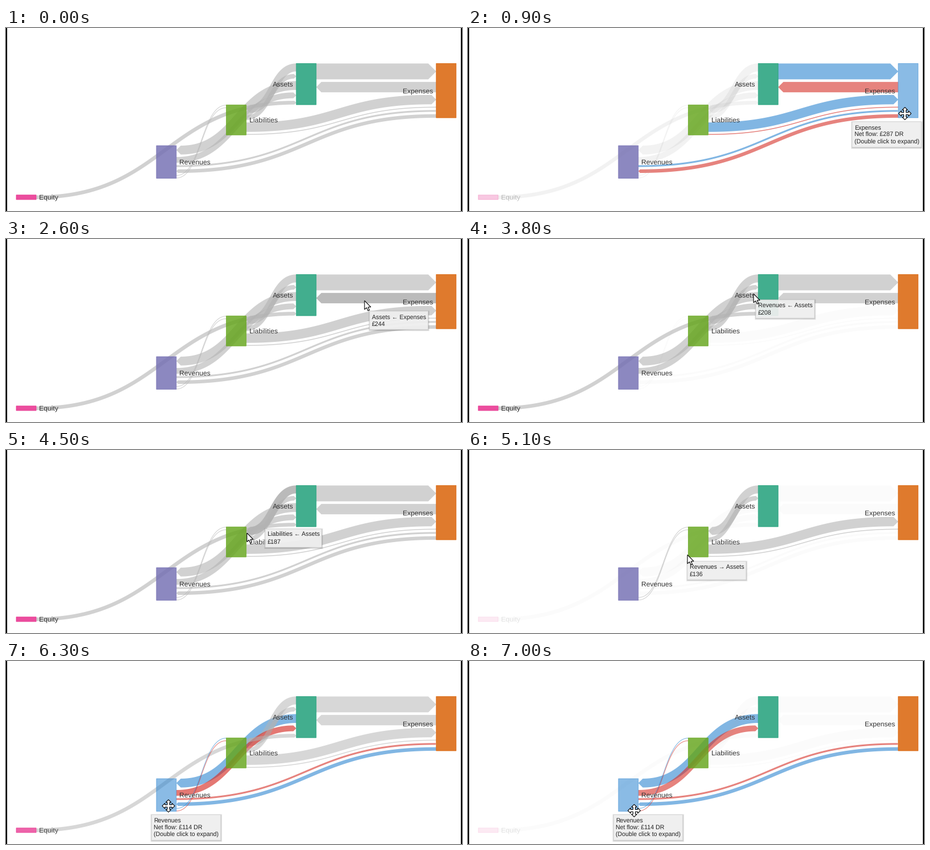
These frames come from a looping animation (800 px wide and 322 px high, 7.1 s). A matplotlib script:

```python
import numpy as np
import matplotlib.pyplot as plt
from matplotlib.animation import FuncAnimation
from matplotlib.colors import to_rgb
from matplotlib.patches import Polygon, Rectangle

W, H, DPI = 800, 322, 100
FRAMES, STEP = 71, 100
PX = 72 / DPI
SCALE = 0.075            # link thickness in pixels per pound
NODE_W = 34.9
GREY, INFLOW, OUTFLOW = "#b3b3b3", "#2e86d1", "#d63028"
LINK_ON, LINK_FADED, LINK_HOT = 0.6, 0.05, 0.9
NODE_ON, NODE_HOT = 0.83, 0.56
FADE, GLOW = 400, 200
HELD = (15, 29, 69)      # frames that repeat the one before

plt.rcParams["font.family"] = "Liberation Sans"
plt.rcParams["text.hinting"] = "none"

# name: x, top, bottom, colour, label x, label alignment
NODES = {
    "Equity": (18, 293.8, 301.9, "#e7298a", 58.2, "left"),
    "Revenues": (263.9, 207, 264.5, "#7570b3", 304, "left"),
    "Liabilities": (386.4, 135.3, 188.2, "#66a61e", 426.6, "left"),
    "Assets": (509.2, 62.4, 135, "#1b9e77", 504, "right"),
    "Expenses": (754.8, 62.4, 158, "#d95f02", 749.2, "right"),
}

# left node, right node, direction, value, left y, right y
LINKS = [
    ("Assets", "Expenses", 1, 372, 76.4, 76.4),
    ("Assets", "Expenses", -1, 244, 104, 104),
    ("Liabilities", "Expenses", 1, 221, 174.5, 126),
    ("Revenues", "Assets", -1, 208, 214.8, 101.2),
    ("Liabilities", "Assets", -1, 187, 142.4, 69.4),
    ("Revenues", "Assets", 1, 136, 232.1, 118.5),
    ("Liabilities", "Assets", 1, 107, 157.8, 85),
    ("Equity", "Assets", 1, 87, 297.8, 131.4),
    ("Revenues", "Expenses", -1, 83, 251.9, 154.8),
    ("Revenues", "Expenses", 1, 41, 243, 145.9),
    ("Liabilities", "Expenses", -1, 20, 187.2, 139.3),
    ("Revenues", "Liabilities", -1, 14, 259.4, 135.7),
    ("Revenues", "Liabilities", 1, 14, 264, 140.4),
]

# start, thing under the pointer (node, link or nothing), tooltip corner
EVENTS = [
    (650, "Expenses", (674, 165)),
    (1250, None, None),
    (1350, ("Revenues", "Expenses", -1), (676, 170)),
    (1690, ("Revenues", "Expenses", 1), (676, 164)),
    (2250, ("Liabilities", "Expenses", 1), (654, 146)),
    (2440, ("Assets", "Expenses", -1), (638, 127)),
    (3080, "Assets", (540, 119)),
    (3790, ("Revenues", "Assets", -1), (505, 107)),
    (4250, ("Liabilities", "Assets", -1), (455, 139)),
    (4520, "Liabilities", (419, 166)),
    (5090, ("Revenues", "Assets", 1), (385, 196)),
    (5450, ("Revenues", "Assets", -1), (350, 219)),
    (5790, ("Revenues", "Assets", 1), (325, 238)),
    (6170, "Revenues", (255.5, 270.5)),
]
ENDS = [e[0] for e in EVENTS[1:]] + [10 ** 6]

# pointer path: time, x, y
PATH = np.array([
    (100, 738, 314), (400, 750, 225), (700, 768, 152), (1100, 765, 149),
    (1250, 752, 153), (1450, 702, 153), (1700, 675.5, 146.5),
    (2200, 671, 142), (2400, 652, 126), (2600, 629, 108.5), (2900, 585, 106),
    (3080, 541, 104), (3400, 527, 100), (3700, 513, 97), (3800, 501, 96.5),
    (4200, 468, 115), (4450, 430, 140), (4600, 408, 158), (4900, 398, 170),
    (5100, 385, 184.5), (5400, 355, 204), (5800, 322.7, 226.5),
    (6100, 301, 243), (6300, 285, 255), (6800, 291.5, 263.3),
])

ARROW = np.array([(0, 0), (0, 15.5), (3.6, 12.3), (6.1, 17.8), (8.6, 16.8),
                  (6.2, 11.4), (11, 11.2)])
ARM = np.array([(-2, -2), (-2, -6.2), (-4.8, -6.2), (0, -11),
                (4.8, -6.2), (2, -6.2)])
TURN = np.array([(0, 1), (-1, 0)])
CROSS = np.vstack([ARM @ np.linalg.matrix_power(TURN, k) for k in range(4)])


def ease(u):
    u = min(max(u, 0), 1)
    return 4 * u ** 3 if u < 0.5 else 1 - 4 * (1 - u) ** 3


def pulse(t, start, end, span):
    return ease((t - start) / span) - ease((t - end) / span)


def ribbon(left, right, way, value, y0, y1):
    """Outline of a curved band with a pointed end."""
    w = value * SCALE
    a, b = NODES[left][0] + NODE_W, NODES[right][0]
    x0, x1 = (a, b - w / 2) if way > 0 else (a + w / 2, b)
    s = np.linspace(0, 1, 70)
    x = x0 * (1 - s) ** 3 + x1 * s ** 3 + 1.5 * (x0 + x1) * s * (1 - s)
    y = y0 + (y1 - y0) * s * s * (3 - 2 * s)
    dx, dy = np.gradient(x), np.gradient(y)
    dy[0] = dy[-1] = 0
    n = np.column_stack([-dy, dx]) / np.hypot(dx, dy)[:, None] * w / 2
    mid = np.column_stack([x, y])
    top, low = mid - n, (mid + n)[::-1]
    if way > 0:
        return np.vstack([top, [(b, y1)], low])
    return np.vstack([top, low, [(a, y0)]])


def net_flow(name):
    total = 0
    for left, right, way, value, *_ in LINKS:
        total += value * way * ((right == name) - (left == name))
    return total


def tip_lines(item):
    if isinstance(item, str):
        net = net_flow(item)
        side = "DR" if net > 0 else "CR"
        return [item, f"Net flow: £{abs(net)} {side}",
                "(Double click to expand)"]
    left, right, way = item
    value = next(k[3] for k in LINKS if k[:3] == item)
    return [f"{left} {'→' if way > 0 else '←'} {right}", f"£{value}"]


def linked(a, b):
    return a == b or any({a, b} == set(k[:2]) for k in LINKS)


fig = plt.figure(figsize=(W / DPI, H / DPI), dpi=DPI, facecolor="white")
ax = fig.add_axes([0, 0, 1, 1])
ax.set(xlim=(0, W), ylim=(H, 0))
ax.axis("off")

bands = [ax.add_patch(Polygon(ribbon(*k), lw=0, zorder=1)) for k in LINKS]
boxes, labels = {}, {}
for name, (x, top, low, color, lx, align) in NODES.items():
    boxes[name] = ax.add_patch(Rectangle((x, top), NODE_W, low - top,
                                         lw=0.9 * PX, snap=False, zorder=2))
    labels[name] = ax.text(lx, (top + low) / 2 + 4.5, name, ha=align,
                           va="baseline", size=12.1 * PX, color="#333",
                           zorder=3)
for x in (0, W - 2):
    ax.add_patch(Rectangle((x, 0), 2, H, color="black", lw=0, zorder=9))

shades = [ax.add_patch(Rectangle((0, 0), 1, 1, color="black", lw=0,
                                 snap=False, zorder=4)) for _ in range(4)]
card = ax.add_patch(Rectangle((0, 0), 1, 1, fc="#f3f3f3", ec="#d2d2d2",
                              lw=0.9 * PX, snap=False, zorder=5))
rows = [ax.text(0, 0, "", size=10.65 * PX, color="#222", va="baseline",
                zorder=6) for _ in range(3)]
pointer = ax.add_patch(Polygon(ARROW, fc="white", ec="black", lw=1.1 * PX,
                               joinstyle="miter", zorder=8))


def current(t):
    found = -1
    for i, event in enumerate(EVENTS):
        if t >= event[0]:
            found = i
    return found


def draw_links(t, hover):
    for band, (left, right, way, *_) in zip(bands, LINKS):
        alpha = LINK_ON
        for (start, item, _), end in zip(EVENTS, ENDS):
            if isinstance(item, str) and item not in (left, right):
                alpha -= (LINK_ON - LINK_FADED) * pulse(t, start, end, FADE)
            elif item == (left, right, way):
                alpha += (LINK_HOT - LINK_ON) * pulse(t, start, end, GLOW)
        color = GREY
        if hover in (left, right):
            goal = right if way > 0 else left
            color = INFLOW if goal == hover else OUTFLOW
        band.set_facecolor(color)
        band.set_alpha(min(max(alpha, 0), 1))


def draw_nodes(t, hover):
    for name, box in boxes.items():
        shown = 1
        for (start, item, _), end in zip(EVENTS, ENDS):
            if isinstance(item, str) and not linked(item, name):
                shown -= 0.88 * pulse(t, start, end, FADE)
        color, alpha = NODES[name][3], NODE_ON
        if name == hover:
            color = INFLOW if net_flow(name) > 0 else OUTFLOW
            alpha = NODE_HOT
        rgb = to_rgb(color)
        box.set_facecolor(rgb + (alpha * shown,))
        box.set_edgecolor(rgb + (alpha * shown,))
        labels[name].set_alpha(shown)


def draw_tip(t, i):
    alpha = 0
    if i >= 0:
        start, item, spot = EVENTS[i]
        if item is None:
            alpha = 1 - ease((t - start) / 300)
            _, item, spot = EVENTS[i - 1]
        elif i == 0 or EVENTS[i - 1][1] is None:
            alpha = ease((t - start) / 200)
        else:
            alpha = 1
    visible = alpha > 0.01
    for part in [card, *rows, *shades]:
        part.set_visible(visible)
    if not visible:
        return
    x, y = spot
    lines = tip_lines(item)
    for k, row in enumerate(rows):
        row.set_text(lines[k] if k < len(lines) else "")
        row.set_position((x + 3.7, y + 13.3 + 12.7 * k))
        row.set_alpha(alpha)
    wide = max(r.get_window_extent().width for r in rows[:len(lines)]) + 7.5
    tall = 12.6 * len(lines) + 7
    card.set_bounds(x - 0.2, y, wide, tall)
    card.set_alpha(0.92 * alpha)
    for k, shade in enumerate(shades):
        shade.set_bounds(x - 0.2 - k * 0.6, y + 0.6 - k * 0.6,
                         wide + 0.6 + k * 1.2, tall + 0.6 + k * 1.2)
        shade.set_alpha(0.06 * alpha)


def draw_pointer(t, hover):
    pointer.set_visible(t >= PATH[0, 0])
    spot = [np.interp(t, PATH[:, 0], PATH[:, k]) for k in (1, 2)]
    pointer.set_xy((CROSS if hover else ARROW) + spot)


def update(i):
    t = (i - 1 if i in HELD else i) * STEP
    now = current(t)
    item = EVENTS[now][1] if now >= 0 else None
    hover = item if isinstance(item, str) else None
    draw_links(t, hover)
    draw_nodes(t, hover)
    draw_tip(t, now)
    draw_pointer(t, hover)
    return []


anim = FuncAnimation(fig, update, frames=FRAMES, interval=STEP,
                     init_func=lambda: update(0), repeat=True, repeat_delay=0)
plt.show()
```
